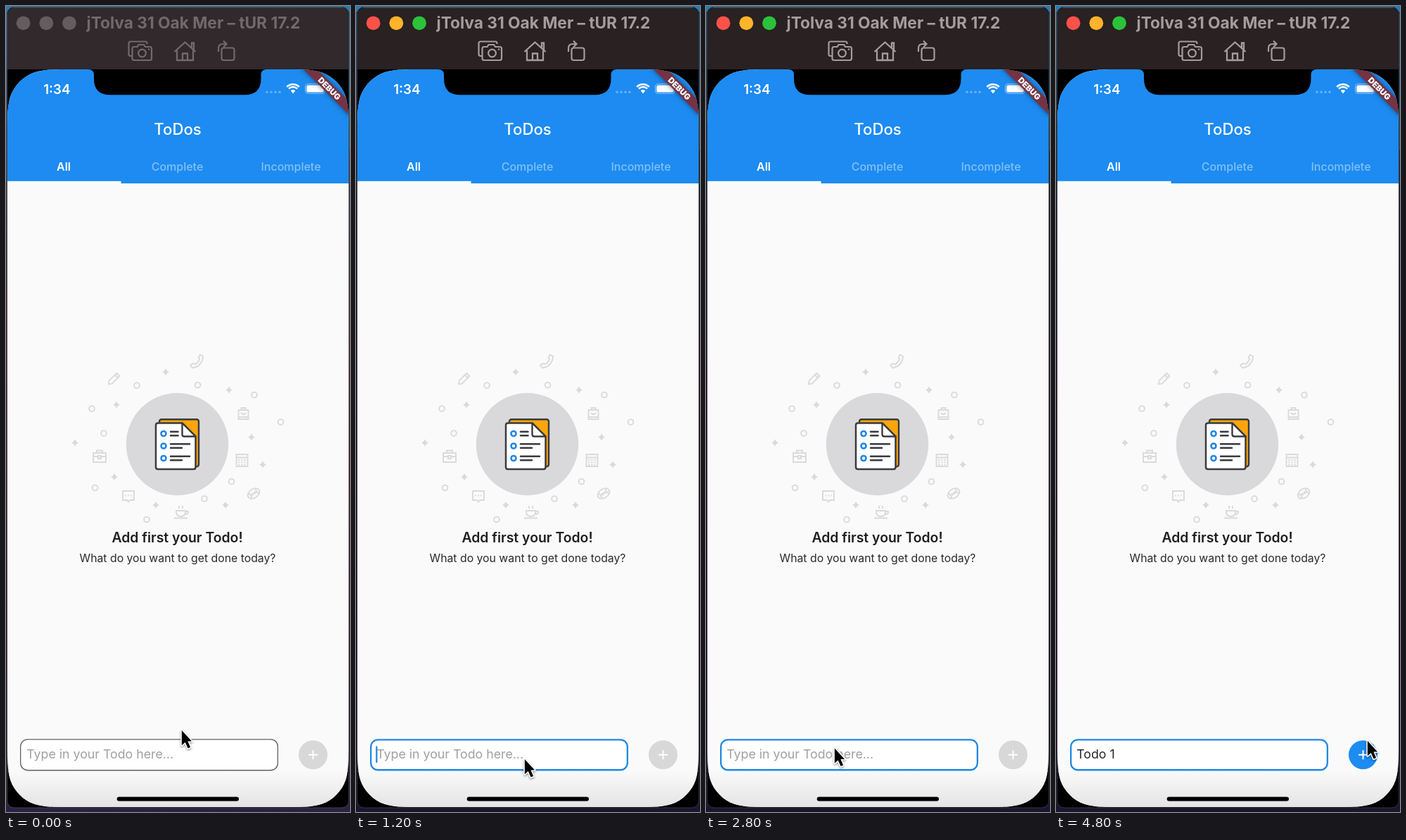
These frames come from a looping animation (489x1145 px, 5 s). An HTML page with a canvas:

```html
<!DOCTYPE html>
<html lang="en">
<head>
<meta charset="utf-8">
<title>ToDos</title>
<style>
html, body { margin: 0; width: 100%; height: 100%; overflow: hidden; background: #16121f; }
canvas { display: block; width: 489px; height: 1145px; }
</style>
</head>
<body>
<canvas id="stage"></canvas>
<script>
const W = 489, H = 1145, LOOP = 5000, STEP = 200;
const BLUE = '#1d8bf1', PALE = '#dadadd', INK = '#393b3f';
const canvas = document.getElementById('stage');
const ratio = window.devicePixelRatio || 1;
canvas.width = W * ratio;
canvas.height = H * ratio;
const ctx = canvas.getContext('2d');

const RINGS = [[186, 539], [272.5, 538.5], [353, 552.5], [122, 572], [139, 607], [390.5, 591],
  [126.5, 684.5], [320.5, 675.5], [282, 700], [200, 729.5]];
const SPARKS = [[227, 520], [317, 545.5], [157, 566.5], [98, 620.5], [349, 612.5], [365, 651.5],
  [154, 669], [213, 709], [312, 709]];

function text(str, x, y, size, weight, color, align = 'left') {
  ctx.font = `${weight} ${size}px Inter, Roboto, sans-serif`;
  ctx.textAlign = align;
  ctx.fillStyle = color;
  ctx.fillText(str, x, y);
}

function rect(x, y, w, h, color) {
  ctx.fillStyle = color;
  ctx.fillRect(x, y, w, h);
}

function paint(fill, stroke, width = 1) {
  if (fill) { ctx.fillStyle = fill; ctx.fill(); }
  if (stroke) { ctx.strokeStyle = stroke; ctx.lineWidth = width; ctx.stroke(); }
}

function round(x, y, w, h, r, fill, stroke, width) {
  ctx.beginPath();
  ctx.roundRect(x, y, w, h, r);
  paint(fill, stroke, width);
}

function circle(x, y, r, fill, stroke, width) {
  ctx.beginPath();
  ctx.arc(x, y, r, 0, Math.PI * 2);
  paint(fill, stroke, width);
}

function shape(d, fill, stroke, width) {
  const p = new Path2D(d);
  if (fill) { ctx.fillStyle = fill; ctx.fill(p); }
  if (stroke) { ctx.strokeStyle = stroke; ctx.lineWidth = width; ctx.stroke(p); }
}

function at(x, y, angle, draw) {
  ctx.save();
  ctx.translate(x, y);
  ctx.rotate(angle);
  draw();
  ctx.restore();
}

function fade(y0, y1, ...colors) {
  const g = ctx.createLinearGradient(0, y0, 0, y1);
  colors.forEach((c, i) => g.addColorStop(i / (colors.length - 1), c));
  return g;
}

// rounded rectangle whose corners ease into the straight sides
function smoothRect(x, y, w, h, r) {
  const path = new Path2D();
  const corner = (cx, cy, ux, uy, vx, vy) => {
    const p = (a, b) => [cx + r * (a * ux + b * vx), cy + r * (a * uy + b * vy)];
    path.lineTo(...p(1.529, 0));
    path.bezierCurveTo(...p(1.088, 0), ...p(0.868, 0), ...p(0.631, 0.075));
    path.bezierCurveTo(...p(0.373, 0.169), ...p(0.169, 0.373), ...p(0.075, 0.631));
    path.bezierCurveTo(...p(0, 0.868), ...p(0, 1.088), ...p(0, 1.529));
  };
  corner(x, y, 0, 1, 1, 0);
  corner(x + w, y, -1, 0, 0, 1);
  corner(x + w, y + h, 0, -1, -1, 0);
  corner(x, y + h, 1, 0, 0, -1);
  path.closePath();
  return path;
}

function backdrop(active) {
  rect(0, 0, W, H, active
    ? fade(0, H, '#225f8d', '#1a2635', '#2a171d', '#22121f', '#1a1630')
    : fade(0, H, '#2c82bf', '#43455e', '#6b2530', '#451c35', '#2b2146'));
  rect(480, 0, 9, 205, active ? '#1d587f' : '#2676ad');
  rect(0, 0, W, 8, '#2a7ab0');
}

function titleBar(active) {
  round(1.5, 1.5, 486, 1137.5, 10, '#000', active ? '#37323a' : '#454044', 1);
  round(2, 2, 485, 88, [10, 10, 0, 0], active ? '#292122' : '#31292b');
  ctx.beginPath();
  ctx.moveTo(10, 2);
  ctx.lineTo(479, 2);
  paint(null, active ? '#6a6668' : '#5a5557', 1);

  const off = '#645d60';
  const lamps = active ? ['#fe5249', '#fdb32a', '#2bc23b'] : [off, off, off];
  lamps.forEach((c, i) => circle(24.6 + i * 32.7, 24.3, 9.9, c));

  const tone = active ? '#a49da0' : '#716a6d';
  text('jTolva 31 Oak Mer – tUR 17.2', 114.5, 31.5, 22.7, 700, tone);

  // screenshot, home and rotate buttons
  shape('M179 71H177Q174.5 71 174.5 68.5V53Q174.5 50.5 177 50.5H198Q200.500 50.500 200.500 53V54', null, tone, 2.2);
  shape('M182 58H186.500L188.500 55H196L198 58H204.500Q207 58 207 60.500V74.500Q207 77 204.500 77H182Q179.500 77 179.500 74.500V60.500Q179.500 58 182 58Z', null, tone, 2.2);
  circle(193.5, 67, 5.4, null, tone, 2.2);
  circle(203, 61.5, 1.2, tone);
  shape('M239.500 65L254.500 51.500L269.500 65M264 59V52.500H267V62M243 63V77H266V63M251 77V67.500H258V77', null, tone, 2.3);
  round(306.5, 59.5, 18, 17.5, 3, null, tone, 2.2);
  shape('M302 65V60Q302 54 308 54H313M309 49.500L313.500 54L309 58.500', null, tone, 2.2);
}

function statusBar() {
  text('1:34', 53.2, 124.5, 18.7, 600, '#fff');
  for (let i = 0; i < 4; i++) circle(371 + i * 6, 122.3, 1.8, '#66b1f6');
  ctx.lineCap = 'butt';
  [4.5, 8.4, 12.3].forEach((r, i) => {
    ctx.beginPath();
    ctx.arc(408, 123.5, r, -Math.PI * 0.755, -Math.PI * 0.245);
    if (i === 0) { ctx.lineTo(408, 124.5); ctx.closePath(); paint('#fff'); }
    else paint(null, '#fff', 2.5);
  });
  round(425.5, 110.8, 28, 13.4, 4, null, '#8ec5f8', 1.1);
  round(427.2, 112.5, 24.6, 10, 2.6, '#fff');
}

function debugRibbon() {
  at(487, 90, Math.PI / 4, () => {
    ctx.save();
    ctx.shadowColor = 'rgba(0,0,0,.5)';
    ctx.shadowBlur = 7 * ratio;
    rect(-60, 31.7, 120, 13.6, '#753343');
    ctx.restore();
    text('DEBUG', 0, 42.7, 11.5, 900, '#fff', 'center');
  });
}

function header() {
  rect(2, 90, 485, 162, BLUE);
  rect(2, 248.8, 161.5, 3.2, '#fff');
  text('ToDos', 244, 183, 22.2, 500, '#fff', 'center');
  text('All', 82, 233.7, 16, 600, '#fff', 'center');
  text('Complete', 243.5, 233.7, 16, 500, '#82c0f8', 'center');
  text('Incomplete', 405, 233.7, 16, 500, '#82c0f8', 'center');
}

function doodles() {
  RINGS.forEach(([x, y]) => circle(x, y, 3.9, null, PALE, 1.9));
  SPARKS.forEach(([x, y]) => at(x, y, 0, () =>
    shape('M0 -5.2Q1.300 -1.300 5.200 0Q1.300 1.300 0 5.200Q-1.300 1.300 -5.200 0Q-1.300 -1.300 0 -5.200Z', PALE)));
  const line = d => shape(d, null, PALE, 1.9);

  at(153, 530, Math.PI / 4, () => line('M-3 -9H3V6L0 10L-3 6ZM-3 -5.500H3'));
  at(271, 504.5, 0, () =>
    line('M5 -9L9 -7Q9 0 4 5Q0 9 -6 9.500L-9 6L-5 3L-2 4.500Q3 1 4 -3L2.500 -5Z'));
  at(337.5, 579, 0, () => line('M-7 -5H7V8H-7ZM-3 -5V-8H3V-5M-3.500 -1Q0 3 3.500 -1M-7 5H7'));
  at(133, 640, 0, () => line('M-9 -5H9V8H-9ZM-4 -5V-8.500H4V-5M-9 0H-2M2 0H9M-2 -1H2V3H-2Z'));
  at(335.5, 645.5, 0, () => {
    line('M-8 -8.500H8V8.500H-8ZM-8 -4H8');
    for (let i = 0; i < 9; i++) rect(-5.5 + i % 3 * 4.2, -1.5 + Math.floor(i / 3) * 3.3, 2.3, 1.9, PALE);
  });
  at(174, 696.5, 0, () => {
    line('M-8 -7.500H8V5.500H2L0 8L-2 5.500H-8Z');
    [-4, 0, 4].forEach(x => circle(x, -1, 1.1, PALE));
  });
  at(352, 692.5, -0.6, () => {
    ctx.beginPath();
    ctx.ellipse(0, 0, 9.2, 6.3, 0, 0, Math.PI * 2);
    paint(null, PALE, 1.9);
    line('M-4 0H4M-2 -2V2M2 -2V2M-6 -4Q-4 0 -6 4M6 -4Q4 0 6 4');
  });
  at(249, 719, 0, () =>
    line('M-7 -2H6V1Q5 6 0 6Q-6 6 -7 1ZM6 -1H10Q11 3 5.500 3M-10 8.500H9M-3 -9V-5M2 -9V-5'));
}

function emptyState() {
  doodles();
  circle(243.5, 622.5, 72.7, '#d9d9db');
  ctx.lineJoin = 'round';
  round(218, 587.3, 56, 67, 3, '#fda50b', INK, 2.4);
  shape('M216 592.500H250.500L269.500 611.500V655Q269.500 658 266.500 658H216Q213 658 213 655V595.500Q213 592.500 216 592.500Z', '#fff', INK, 2.5);
  shape('M250.500 592.500V608.500Q250.500 611.500 253.500 611.500H269.500Z', '#fff', INK, 2.4);
  ctx.lineCap = 'round';
  [607.5, 625, 642.5].forEach((y, i) => {
    circle(224, y, 3.5, '#fff', '#2186e4', 2.6);
    const long = i ? 261 : 244.5, short = i ? 250 : 244.5;
    shape(`M234 ${y - 2.8}H${long}M234 ${y + 2.8}H${short}`, null, INK, 2.5);
  });
  ctx.lineCap = 'butt';
  ctx.lineJoin = 'miter';
  text('Add first your Todo!', 243.5, 761.7, 19.4, 600, '#1f1f1f', 'center');
  text('What do you want to get done today?', 244, 790, 15.8, 400, '#2b2b2b', 'center');
}

function inputBar(focused, typed, caret) {
  const edge = focused ? 2.3 : 1.3;
  round(20 + edge / 2, 1041.2 + edge / 2, 367 - edge, 45.2 - edge, 10, '#fff',
    focused ? '#2089e4' : '#606060', edge);
  text(typed || 'Type in your Todo here...', 29.2, 1069.3, 17.75, 400, typed ? '#262626' : '#a0a0a0');
  if (caret) {
    const x = typed ? 29.2 + ctx.measureText(typed).width : 28.2;
    rect(x, 1051.5, 2.2, 23.5, '#2586dc');
  }
  circle(436.5, 1063.7, 20.5, typed ? BLUE : '#d8d8d8');
  shape('M430 1063.700H443M436.500 1057.200V1070.200', null, '#fff', 1.9);
}

const SCREEN = smoothRect(2, 90, 485, 1048, 60);

function phone(state) {
  ctx.save();
  ctx.clip(SCREEN);
  rect(2, 90, 485, 1048, '#fafafa');
  rect(2, 1086, 485, 52, fade(1086, 1138, '#fafafa', '#e4e4e4'));
  header();
  statusBar();
  emptyState();
  inputBar(state.focused, state.typed, state.caret);
  debugRibbon();
  shape('M117 90Q125 90 125 98V103.500Q125 126.300 148 126.300H339Q362.500 126.300 362.500 103.500V98Q362.500 90 370.500 90Z', '#000');
  ctx.restore();
  round(157.7, 1123.5, 173.3, 6, 3, '#000');
}

function pointer(x, y) {
  at(x, y, 0, () => {
    ctx.scale(1.04, 1.04);
    const d = 'M.8 1V21.500L5.500 17.200L9.200 25.600L12.600 24.100L9 15.900H14.500Z';
    ctx.lineJoin = 'round';
    ctx.save();
    ctx.shadowColor = 'rgba(0,0,0,.35)';
    ctx.shadowBlur = 3 * ratio;
    ctx.shadowOffsetY = 1.5 * ratio;
    shape(d, '#fff', '#fff', 3);
    ctx.restore();
    shape(d, '#000');
    ctx.lineJoin = 'miter';
  });
}

// time, x, y
const PATH = [[0, 249, 1028], [600, 239, 1071], [1000, 239, 1071], [1200, 239, 1069],
  [1600, 239, 1069], [2400, 182, 1053.5], [4200, 182, 1053.5], [4800, 442, 1043]];

function pointerAt(t) {
  const i = PATH.findIndex(p => p[0] > t);
  if (i < 0) return PATH[PATH.length - 1].slice(1);
  const [t0, x0, y0] = PATH[i - 1], [t1, x1, y1] = PATH[i];
  const u = (t - t0) / (t1 - t0), e = u * u * (3 - 2 * u);
  return [x0 + (x1 - x0) * e, y0 + (y1 - y0) * e];
}

function typedAt(t) {
  if (t < 3000) return '';
  if (t < 3200) return 'To';
  if (t < 4000) return 'Todo';
  return t < 4200 ? 'Todo ' : 'Todo 1';
}

// the blink restarts on focus and on typing
function caretAt(t) {
  if (t < 1200) return false;
  const since = [4200, 4000, 3200, 3000, 1200].find(s => t >= s);
  return Math.floor((t - since) / 500) % 2 === 0;
}

function render(now) {
  const t = Math.floor((now % LOOP) / STEP) * STEP;
  const active = t >= 800;
  ctx.setTransform(ratio, 0, 0, ratio, 0, 0);
  backdrop(active);
  titleBar(active);
  phone({ focused: t >= 1200, typed: typedAt(t), caret: caretAt(t) });
  pointer(...pointerAt(t));
}

let start;
function frame(now) {
  if (start === undefined) start = now;
  render(now - start);
  requestAnimationFrame(frame);
}
render(0);
requestAnimationFrame(frame);
</script>
</body>
</html>
```
